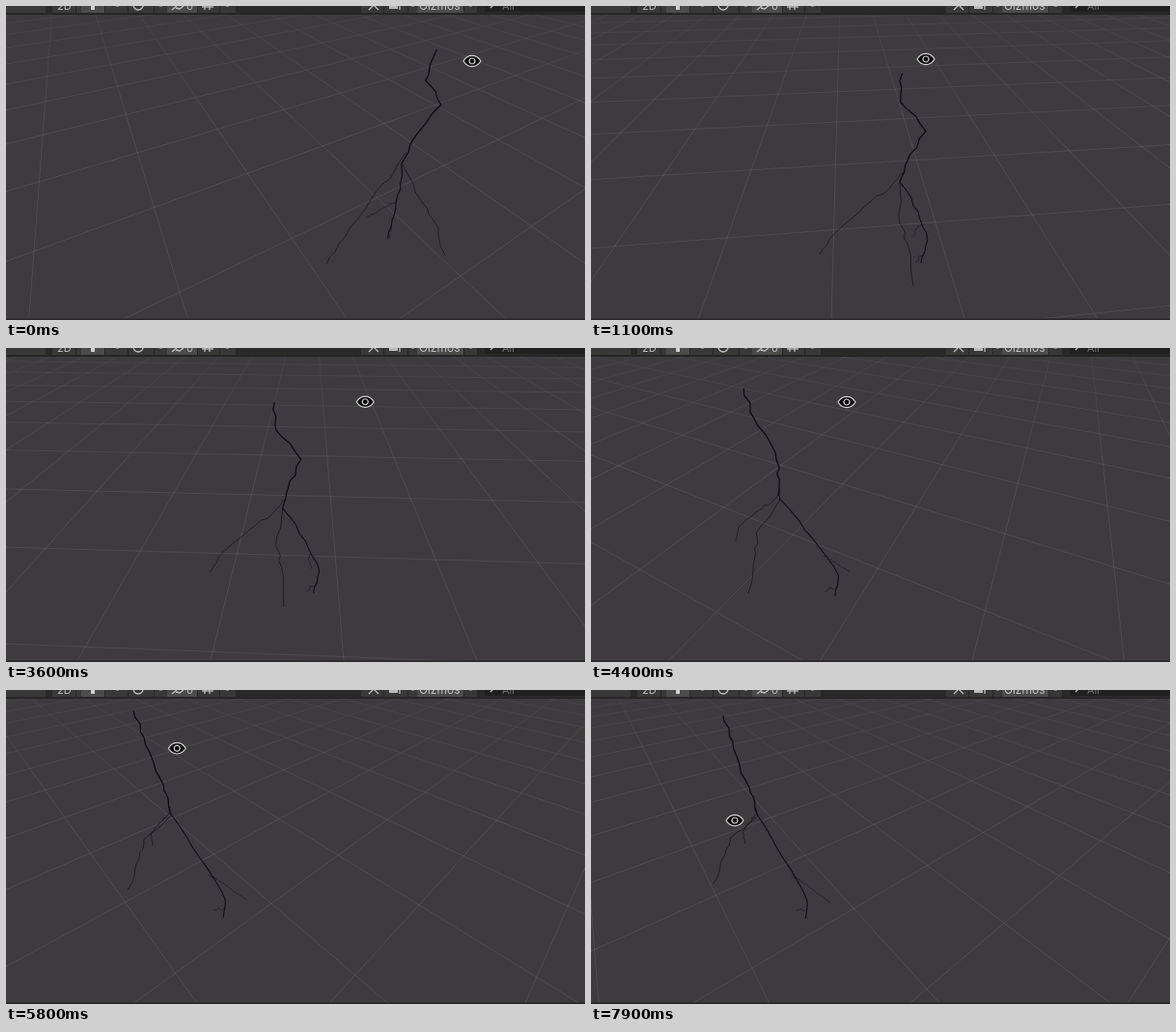
An HTML page with a canvas that plays this animation: 600x325 px, repeating every 8 s.

```html
<!DOCTYPE html>
<html lang="en">
<head>
<meta charset="utf-8">
<title>Scene view</title>
<style>
  html, body { margin: 0; width: 100%; height: 100%; overflow: hidden; background: #3d3b3e; }
  canvas { display: block; }
</style>
</head>
<body>
<canvas id="stage" width="600" height="325"></canvas>
<script>
const ctx = document.getElementById('stage').getContext('2d');
const LOOP = 8000, STEP = 100;
const CX = 300, CY = 166, FOCAL = 318, GRID_SCALE = 0.328, RANGE = 18, NEAR = 0.5;

// Rows: time, hold, then values
// Camera values: yaw in degrees, horizon y, ground position u and v
const cameraTrack = [
  [0, 0, -30, -111, 0.2, 0.55],
  [1100, 0, -5.5, -95, 1.267, 0.06],
  [1800, 2000, 2.2, -97, 1.678, -0.09],
  [4400, 0, 26.2, -107, 2.83, 0.37],
  [5200, 0, 38.6, -112, 3.292, 0.63],
  [6600, 0, 55.1, -102, 3.83, 1.11],
  [6900, 700, 53.2, -101, 3.74, 1.06],
  [7900, 0, 51.9, -100, 3.67, 1.02]
];

// Cursor values: x, y
const eyeTrack = [
  [0, 0, 483, 57], [1100, 0, 347, 55], [1800, 500, 304, 51], [2400, 0, 297, 52],
  [2800, 500, 232, 49], [3700, 100, 419, 58], [4400, 0, 265, 56], [5200, 0, 206, 53],
  [6600, 0, 139, 70], [6900, 100, 149, 81], [7200, 100, 149, 143], [7400, 0, 149, 135]
];

// The bolt in world space: each branch has a width, an opacity and u, v, height points
const fork = [1.53, 1.5, 1.03];
const bolt = [
  { width: 1.25, alpha: 0.95, points: [[1.51, 1.48, 1.76], [1.51, 1.49, 1.6], [1.65, 1.45, 1.44], [1.57, 1.5, 1.2], fork] },
  { width: 1.1, alpha: 0.85, points: [fork, [1.69, 1.56, 0.665], [1.82, 1.63, 0.22], [1.78, 1.59, -0.05]] },
  { width: 0.9, alpha: 0.65, points: [fork, [1.5, 1.265, 0.91], [1.54, 1.18, 0.81], [1.56, 1.02, 0.61]] },
  { width: 0.9, alpha: 0.6, points: [[1.55, 1.5, 1.11], [1.47, 1.49, 1], [1.29, 1.47, 0.85], [1.08, 1.43, 0.65], [0.95, 1.43, 0.425]] },
  { width: 0.8, alpha: 0.5, points: [[1.73, 1.575, 0.5], [1.72, 1.68, 0.32], [1.76, 1.88, -0.05]] },
  { width: 0.8, alpha: 0.5, points: [[1.8, 1.61, 0.09], [1.71, 1.54, 0.04]] }
];

const lerp = (a, b, k) => a + (b - a) * k;
const mix = (a, b, k) => a.map((n, i) => lerp(n, b[i], k));

function random(seed) {
  return () => (seed = (seed * 16807) % 2147483647) / 2147483647;
}

// Splits each segment and shakes the new points a little
function roughen(points, rand, parts = 4, amount = 0.022) {
  return points.flatMap((p, i) => {
    const next = points[i + 1];
    if (!next) return [p];
    return Array.from({ length: parts }, (_, j) =>
      j ? mix(p, next, j / parts).map(n => n + (rand() - 0.5) * amount) : p);
  });
}

const rand = random(71);
bolt.forEach(branch => { branch.points = roughen(branch.points, rand); });

function sample(track, t) {
  const next = track.findIndex(key => key[0] > t);
  if (next < 0) return track[track.length - 1].slice(2);
  const a = track[next - 1], b = track[next], leave = a[0] + a[1];
  const k = Math.max(0, (t - leave) / (b[0] - leave));
  return mix(a, b, k).slice(2);
}

function makeCamera([yaw, horizon, u0, v0]) {
  const a = yaw * Math.PI / 180, pitch = Math.atan((CY - horizon) / FOCAL);
  const sin = Math.sin(a), cos = Math.cos(a);
  const sinP = Math.sin(pitch), cosP = Math.cos(pitch), eyeHeight = cosP / GRID_SCALE;
  return {
    u0, v0,
    toView([u, v, height = 0]) {
      const du = u - u0, dv = v - v0, below = eyeHeight - height;
      const ahead = dv * cos - du * sin;
      return [du * cos + dv * sin, below * cosP - ahead * sinP, ahead * cosP + below * sinP];
    }
  };
}

const toScreen = ([x, y, z]) => [CX + FOCAL * x / z, CY + FOCAL * y / z];

function gridLine(cam, a, b) {
  let p = cam.toView(a), q = cam.toView(b);
  if (p[2] < q[2]) [p, q] = [q, p];
  if (p[2] <= NEAR) return;
  if (q[2] < NEAR) q = mix(p, q, (p[2] - NEAR) / (p[2] - q[2]));
  ctx.moveTo(...toScreen(p));
  ctx.lineTo(...toScreen(q));
}

function drawGrid(cam) {
  const fade = ctx.createLinearGradient(0, 9, 0, 130);
  fade.addColorStop(0, 'rgba(255,255,255,.035)');
  fade.addColorStop(1, 'rgba(255,255,255,.085)');
  ctx.strokeStyle = fade;
  ctx.lineWidth = 1;
  ctx.beginPath();
  const u = Math.round(cam.u0), v = Math.round(cam.v0);
  for (let i = -RANGE; i <= RANGE; i++) {
    gridLine(cam, [u + i, v - RANGE], [u + i, v + RANGE]);
    gridLine(cam, [u - RANGE, v + i], [u + RANGE, v + i]);
  }
  ctx.stroke();
}

function strokePath(points) {
  ctx.beginPath();
  points.forEach(p => ctx.lineTo(...p));
  ctx.stroke();
}

function drawBolt(cam) {
  ctx.lineJoin = 'round';
  for (const { width, alpha, points } of bolt) {
    ctx.lineWidth = width;
    ctx.strokeStyle = `rgba(8,7,18,${alpha})`;
    strokePath(points.map(p => toScreen(cam.toView(p))));
  }
}

function drawEye(x, y) {
  ctx.save();
  ctx.translate(x, y);
  ctx.beginPath();
  ctx.moveTo(-9, 0);
  ctx.bezierCurveTo(-4.5, -7.6, 4.5, -7.6, 9, 0);
  ctx.bezierCurveTo(4.5, 7.6, -4.5, 7.6, -9, 0);
  ctx.closePath();
  ctx.fillStyle = '#0a0a0a';
  ctx.fill();
  ctx.strokeStyle = '#d2d2d2';
  ctx.lineWidth = 1.2;
  ctx.stroke();
  ctx.beginPath();
  ctx.arc(0, 0, 3, 0, 7);
  ctx.stroke();
  ctx.restore();
}

function rect(color, x, y, w, h) {
  ctx.fillStyle = color;
  ctx.fillRect(x, y, w, h);
}

function label(text, x, size, color = '#c0c0c0') {
  ctx.fillStyle = color;
  ctx.font = `${size}px Inter, Roboto, sans-serif`;
  ctx.fillText(text, x, 3.5);
}

function drawToolbar() {
  rect('#292929', 0, 0, 600, 9);
  rect('#383838', 0, 0, 41, 7);
  rect('#383838', 48, 0, 190, 7);
  rect('#383838', 368, 0, 120, 7);
  for (const [x, w] of [[78, 24], [167, 31], [426, 48]]) rect('#4b4b4b', x, 0, w, 7);
  for (const x of [72, 102, 126, 153, 198, 221, 391, 416, 474]) rect('#262626', x, 0, 1, 7);
  rect('#202020', 496, 0, 104, 6);
  rect('#222', 0, 8, 600, 1);

  label('2D', 53, 11);
  label('0', 187, 11);
  label('Gizmos', 428, 12);
  label('All', 514, 11, '#707070');

  rect('#d0d0d0', 88, 0, 4, 4);
  rect('#bbb', 397, 0, 9, 3);
  for (const x of [115, 160, 229, 421, 481]) rect('#777', x - 1, 0, 3, 1);
  ctx.strokeStyle = '#c0c0c0';
  ctx.lineWidth = 1.3;
  ctx.beginPath();
  ctx.arc(137, -1, 5, 0, Math.PI);
  ctx.stroke();
  strokePath([[172, 4], [177, 0]]);
  strokePath([[176, 2], [180, 3], [184, 0]]);
  strokePath([[203, 1], [215, 1]]);
  for (const x of [206, 211, 408]) strokePath([[x, 0], [x, 4]]);
  strokePath([[376, 4], [381, -1], [386, 4]]);
  strokePath([[502, 2], [505, -1]]);
}

function draw(t) {
  const cam = makeCamera(sample(cameraTrack, t));
  rect('#3d3b3e', 0, 0, 600, 325);
  drawGrid(cam);
  drawBolt(cam);
  drawEye(...sample(eyeTrack, t));
  drawToolbar();
  rect('#272627', 0, 323.5, 600, 1.5);
}

const start = performance.now();
function tick() {
  const t = Math.max(0, performance.now() - start) % LOOP;
  draw(Math.floor(t / STEP) * STEP);
  requestAnimationFrame(tick);
}
tick();
</script>
</body>
</html>
```
